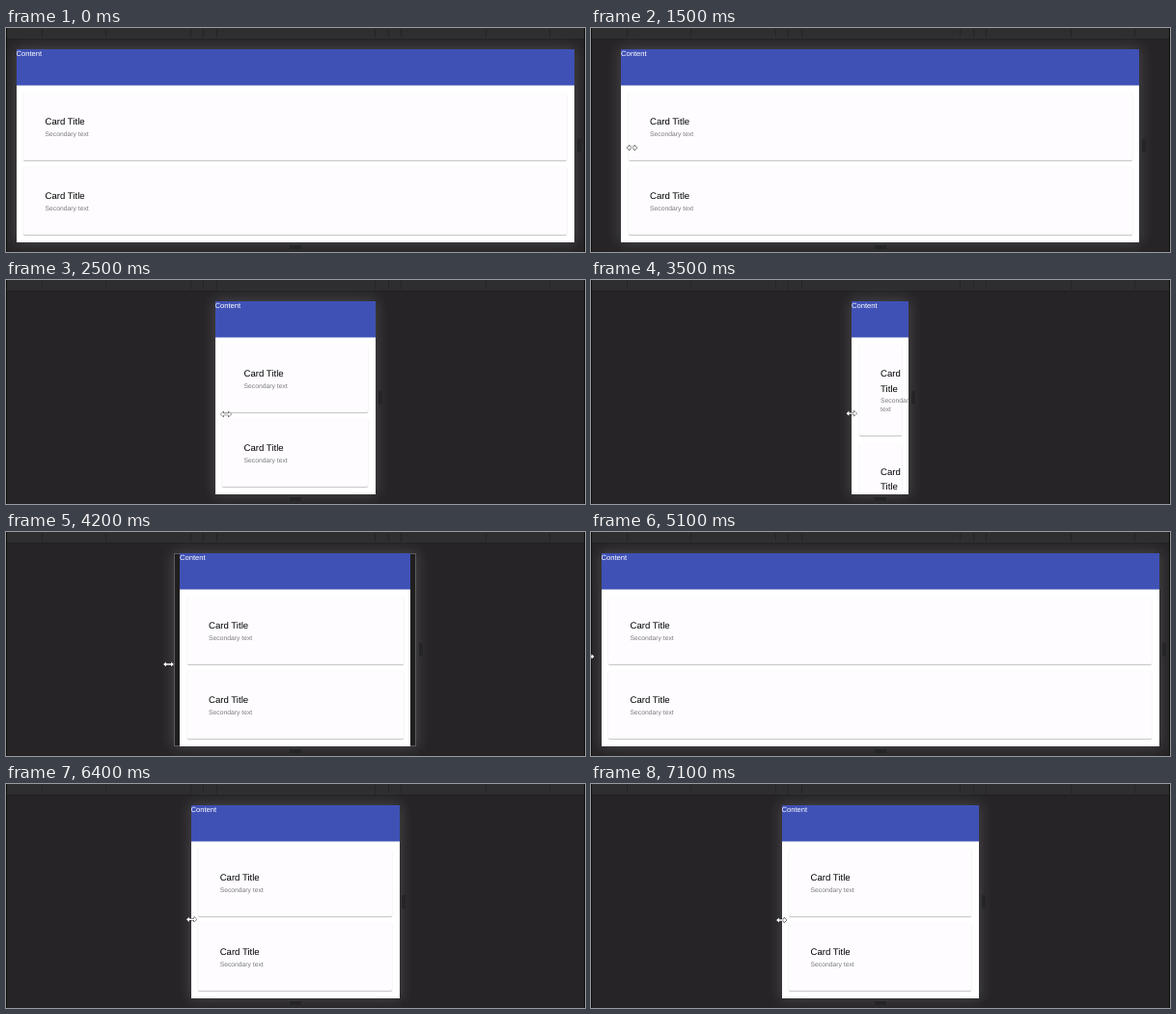
These frames come from a looping animation (600x232 px, 7200 ms). An HTML page:

```html
<!DOCTYPE html>
<html lang="en">
<head>
<meta charset="utf-8">
<title>Responsive cards</title>
<style>
html, body { margin: 0; width: 100%; height: 100%; overflow: hidden; background: #262427; }
#stage {
  position: relative; width: 600px; height: 232px; overflow: hidden; background: #262427;
  font-family: "Liberation Sans", Arial, sans-serif; text-rendering: geometricPrecision;
}
#stage > * { position: absolute; }
#ruler { left: 0; top: 0; width: 600px; height: 11px; background: #2e2d2f; border-bottom: 1px solid #201f21; }
#ruler i { position: absolute; top: 1px; width: 1px; height: 9px; background: #242325; }
#edges { inset: 0; border: solid #0c0c0c; border-width: 0 1px; }
#frame {
  top: 22px; height: 199.5px; background: #201f20;
  box-shadow: inset 0 0 0 1px #5c5b5c, 0 0 14px 1px rgba(255, 255, 255, .17);
}
#page {
  top: 22px; height: 199.5px; overflow: hidden;
  background: linear-gradient(#3f51b5 37px, #fff 38px);
}
header { height: 37.5px; color: #fff; font-size: 7.6px; line-height: 9px; }
.card {
  margin: 7.5px 7.7px 0; padding: 23.3px 22.4px 21.5px; background: #fefcff; border-radius: 1.5px;
  box-shadow: 0 1px .8px rgba(0, 0, 0, .17), 0 .5px 1.5px rgba(0, 0, 0, .13);
}
.title { font-size: 9.6px; line-height: 15.2px; color: #000; }
.text { font-size: 6.78px; line-height: 9.5px; color: #7a7a7a; }
.grip { background: #252426; border-radius: 1px; }
#side { top: 115px; width: 4px; height: 14px; }
#base { left: 293.5px; top: 225px; width: 12px; height: 4px; }
#corner { top: 225px; width: 4px; height: 4px; opacity: .4; }
#cursor { left: -8px; top: -6px; }
</style>
</head>
<body>
<div id="stage">
  <div id="ruler"></div>
  <div id="frame"></div>
  <div id="page">
    <header>Content</header>
    <div class="card"><div class="title">Card Title</div><div class="text">Secondary text</div></div>
    <div class="card"><div class="title">Card Title</div><div class="text">Secondary text</div></div>
  </div>
  <div id="side" class="grip"></div>
  <div id="base" class="grip"></div>
  <div id="corner" class="grip"></div>
  <div id="edges"></div>
  <svg id="cursor" width="16" height="12" viewBox="-8 -6 16 12">
    <path d="M-5.4 0L-2.6-2.6V-.7H2.6V-2.6L5.4 0L2.6 2.6V.7H-2.6V2.6Z"
      fill="#fff" stroke="#222" stroke-width="1" paint-order="stroke"/>
  </svg>
</div>
<script>
const LOOP = 7200, STEP = 100;
const MID = 299.65, MIN_LEFT = 10.5, MAX_LEAD = 11.5;

// Turning points of the drag: time, dragged edge, pointer height
const KEYS = [
  [400, -20, 130],
  [900, 10.5, 118],
  [1300, 10.5, 120],
  [1500, 31, 124],
  [2500, 216.5, 139],
  [2800, 270, 139],
  [3600, 270, 138],
  [4200, 180, 137],
  [4900, -2, 129],
  [5250, -2, 129],
  [5800, 150.5, 139],
  [6100, 189, 140],
  [7100, 197.5, 141]
];

const el = id => document.getElementById(id);
const clamp = (v, lo, hi) => Math.min(hi, Math.max(lo, v));

// Screen-width marks, mirrored around the middle
for (const width of [320, 375, 425, 768, 1024]) {
  for (const side of [-1, 1]) {
    const mark = document.createElement("i");
    mark.style.left = Math.round(300 + side * width * .2565) + "px";
    el("ruler").append(mark);
  }
}

function dragAt(t) {
  const n = KEYS.findIndex(k => k[0] > t);
  if (n === 0) return KEYS[0].slice(1);
  if (n < 0) return KEYS[KEYS.length - 1].slice(1);
  const a = KEYS[n - 1], b = KEYS[n];
  const p = (t - a[0]) / (b[0] - a[0]);
  return [1, 2].map(i => a[i] + (b[i] - a[i]) * p);
}

function span(id, left) {
  const s = el(id).style;
  s.left = left + "px";
  s.width = 2 * (MID - left) + "px";
}

function draw(t) {
  const [edge, y] = dragAt(t);
  // The pointer runs ahead of the page, and the frame follows it when widening
  const lead = clamp(dragAt(t + STEP)[0] - edge, -MAX_LEAD, MAX_LEAD);
  const left = Math.max(MIN_LEFT, edge);
  const outer = Math.max(MIN_LEFT, left + Math.min(0, lead / 2));
  span("page", left);
  span("frame", outer);
  for (const id of ["side", "corner"]) el(id).style.left = 2 * MID - outer + 2.7 + "px";
  el("cursor").style.transform = `translate(${edge + lead}px, ${y}px)`;
}

const start = performance.now();
function tick() {
  const t = (performance.now() - start) % LOOP;
  draw(Math.floor(t / STEP) * STEP);
  requestAnimationFrame(tick);
}
tick();
</script>
</body>
</html>
```
